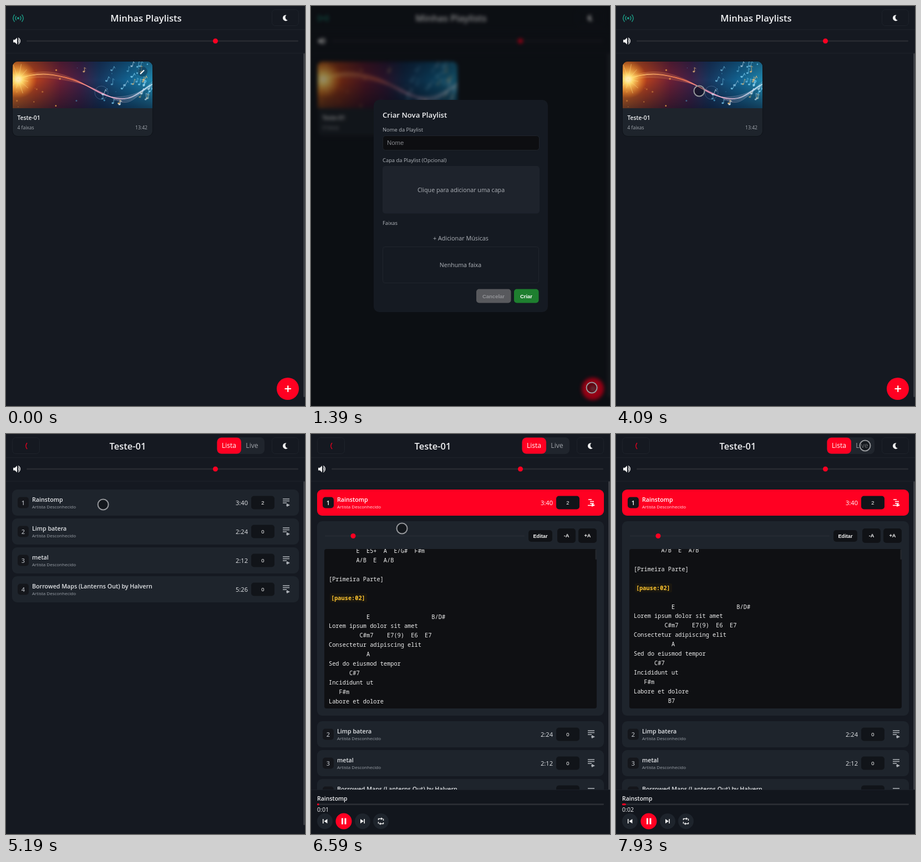
An HTML page that plays this animation: 539 px wide and 720 px high, repeating every 7.99 s.

```html
<!DOCTYPE html>
<html lang="pt">
<head>
<meta charset="utf-8">
<title>Minhas Playlists</title>
<style>
  html, body { margin: 0; width: 100%; height: 100%; overflow: hidden; background: #151921; }
  svg { display: block; width: 539px; height: 720px; }
  text { font-family: "Open Sans", "Noto Sans", sans-serif; white-space: pre; }
  .arial { font-family: "Liberation Sans", Arial, sans-serif; }
  .mono { font-family: "Noto Sans Mono", "DejaVu Sans Mono", monospace; }
</style>
</head>
<body>
<svg id="stage" viewBox="0 0 539 720"></svg>
<script>
const LOOP = 7990;
const MODAL_OPEN = 1200, MODAL_CLOSE = 3300, DETAIL_OPEN = 4700, PLAY_START = 5480;
const RED = '#ff0022', CARD = '#1e242c', DARK = '#101216', LINE = '#1e232b';
const SONG = 'Rainstomp';

const rect = (x, y, w, h, r, fill, extra = '') =>
  `<rect x="${x}" y="${y}" width="${w}" height="${h}" rx="${r}" fill="${fill}" ${extra}/>`;
const circle = (x, y, r, fill, extra = '') =>
  `<circle cx="${x}" cy="${y}" r="${r}" fill="${fill}" ${extra}/>`;
const stroke = (d, color, width = 1.5, extra = '') =>
  `<path d="${d}" fill="none" stroke="${color}" stroke-width="${width}" ${extra}/>`;
const shape = (d, fill) => `<path d="${d}" fill="${fill}"/>`;
const text = (x, y, size, str, fill = '#fff', weight = 400, anchor = 'start', extra = '') =>
  `<text x="${x}" y="${y}" font-size="${size}" fill="${fill}" font-weight="${weight}" text-anchor="${anchor}" ${extra}>${str}</text>`;
const arial = (x, y, size, str, fill, weight = 700, anchor = 'middle') =>
  text(x, y, size, str, fill, weight, anchor, 'class="arial"');
const group = (id, content, extra = '') => `<g id="${id}" ${extra}>${content}</g>`;

function seeded(seed) {
  return () => (seed = (seed * 16807) % 2147483647) / 2147483647;
}

function cover() {
  const rnd = seeded(77);
  let art = rect(12, 100, 252, 84, 0, 'url(#sky)') + rect(12, 100, 252, 84, 0, 'url(#shade)');
  for (let i = 0; i < 24; i++) {
    const x = 14 + rnd() * 248, y = 102 + rnd() * 80;
    art += circle(x, y, 0.5 + rnd() * 1.6, x < 110 ? '#ffb04a' : '#5cc8f5', `opacity="${0.25 + rnd() * 0.5}"`);
  }
  for (let i = 0; i < 6; i++) {
    const k = i * 2.4;
    art += stroke(`M20 ${130 + k / 3}C60 ${112 + k} 90 ${118 + k} 120 ${130 + k / 2}S170 ${166 - k} 200 ${164 + k / 2}S245 ${155 - k} 264 ${136 + k}`,
      'url(#wave)', i === 2 ? 1.8 : 0.7, `opacity="${i === 2 ? 0.9 : 0.55}"`);
  }
  art += circle(172, 156, 12, 'none', 'stroke="#6b88b0" opacity=".45"');
  for (let i = 0; i < 32; i++) {
    const x = 130 + Math.sqrt(rnd()) * 130, y = 108 + rnd() * 70, h = 6 + rnd() * 5;
    const color = ['#d9efff', '#7ed0f4', '#f4c37c'][Math.floor(rnd() * 3)];
    art += `<g transform="translate(${x} ${y}) rotate(${rnd() * 40 - 10})" opacity="${0.45 + rnd() * 0.45}">` +
      `<ellipse rx="2" ry="1.5" fill="${color}"/>` + stroke(`M1.7 0V${-h}l3 2.5`, color, 0.9) + '</g>';
  }
  art += circle(22, 132, 34, 'url(#burst)');
  for (let i = 0; i < 12; i++) {
    const a = i * Math.PI / 6 + 0.2, r = 14 + rnd() * 16;
    art += stroke(`M22 132l${Math.cos(a) * r} ${Math.sin(a) * r}`, '#ffe08a', 0.8, 'opacity=".6"');
  }
  return art;
}

const header =
  stroke('M0 42.5H539M0 85H539', LINE, 1) +
  rect(479.5, 6.5, 48, 29, 6, 'none', `stroke="${LINE}"`) +
  shape('M505.5 16.3A5.4 5.4 0 1 0 508 25.6A5.3 5.3 0 0 1 505.5 16.3Z', '#f2f2f2') +
  shape('M13 60.7h3l4-3.8v12.4l-4-3.8h-3z', '#f2f2f2') +
  stroke('M22 60.3q2.4 2.8 0 5.6M22.3 57.4q6.4 5.6 0 11.4', '#f2f2f2', 1.4) +
  rect(37, 61.8, 490, 2.5, 1.2, '#282b32') + circle(377.5, 63, 4.5, RED) +
  rect(536, 85, 3, 619, 1.5, '#3b3e44');

const home =
  group('live', circle(22, 22, 2, 'currentColor') +
    stroke('M18.6 18.3q-3 3.7 0 7.4M25.4 18.3q3 3.7 0 7.4M15.5 15.5q-5.4 6.5 0 13M28.5 15.5q5.4 6.5 0 13', 'currentColor', 1.5)) +
  text(252.5, 27.5, 16.6, 'Minhas Playlists', '#f0f1f3', 600, 'middle') +
  rect(11, 99, 254, 136, 10, '#0f1319') + rect(12, 100, 252, 134, 9, CARD) +
  `<g clip-path="url(#coverClip)">${cover()}</g>` +
  group('pencil', circle(246, 118, 9, '#10304a', 'opacity=".5"') + stroke('M242 122.500l7-7', '#fff', 2.2)) +
  text(20.500, 205, 10.3, 'Teste-01', '#f2f3f5', 600) +
  text(20.500, 222, 8.5, '4 faixas', '#a4a9b0') +
  text(255, 222, 8.6, '13:42', '#a4a9b0', 400, 'end') +
  circle(508, 689, 20, RED) + stroke('M502.500 689h11.500M508.250 683.250v11.500', '#fff', 2.2);

function row(y, number, title, time, count, active = false) {
  const icon = active ? '#fff' : '#aeb2b8';
  const lines = active ? 'M500 -5h6M503 -1.500h7M503 2h7M499 5.500h12' : 'M499 -6h12M499 -2.500h12M499 1h7M505 5h4';
  return rect(11, y, 517, 47, 9, active ? RED : CARD) +
    rect(21, y + 13.5, 20, 20, 5, '#14161b') +
    text(31, y + 27.5, 11, number, active ? '#fff' : '#a9adb3', 600, 'middle') +
    text(47, y + 22, 10.7, title, active ? '#fff' : '#e4e6e9', 600) +
    text(47, y + 34, 8, 'Artista Desconhecido', active ? '#ffe3e6' : '#9ba1a9') +
    text(436, y + 27.5, 11.1, time, active ? '#fff' : '#e4e6e9', 400, 'end') +
    rect(442, y + 11.5, 42, 24, 5, '#111419') +
    arial(463, y + 27, 9.5, count, '#fff', 400) +
    `<g transform="translate(0 ${y + 23})">${stroke(lines, icon, 1.6)}${shape('M506 2l6 3-6 3z', icon)}</g>`;
}

const otherRows = y =>
  row(y, 2, 'Limp batera', '2:24', 0) +
  row(y + 52, 3, 'metal', '2:12', 0) +
  row(y + 104, 4, 'Borrowed Maps (Lanterns Out) by Halvern', '5:26', 0);

const lyrics = `[Intro] E  E5+  A  F#m  A/B
        E  E5+  A  E/G#  F#m
        A/B  E  A/B

[Primeira Parte]

[pause:02]

           E                  B/D#
Lorem ipsum dolor sit amet
         C#m7    E7(9)  E6  E7
Consectetur adipiscing elit
           A
Sed do eiusmod tempor
      C#7
Incididunt ut
   F#m
Labore et dolore
          B7`.split('\n').map((line, i) => {
  const y = i * 16.9, pause = line.startsWith('[pause');
  return (pause ? rect(34, y - 8, 67, 16, 2, '#1a1710') : '') +
    text(pause ? 36 : 32, y + 3.7, 10.3, line, pause ? '#ffc52e' : '#f0f0f0', pause ? 700 : 400, 'start', 'class="mono"');
}).join('');

const smallButton = (x, y, w, h, label) =>
  rect(x, y, w, h, 5, DARK) + arial(x + w / 2, y + h / 2 + 3.2, 9.2, label, '#f4f4f4');

const playing =
  row(100, 1, SONG, '3:40', 2, true) +
  rect(11, 157, 517, 350, 9, CARD) +
  rect(25, 182.5, 360, 2, 1, '#262b33') + circle(76, 183.5, 4.5, RED) +
  smallButton(392, 173, 43, 21, 'Editar') +
  smallButton(444, 170, 33, 26, '-A') +
  smallButton(482, 170, 33, 26, '+A') +
  rect(24, 207, 491, 287, 4, '#0f1013') + rect(512.5, 208, 2.5, 18, 1, '#24272d') +
  `<g clip-path="url(#lyricsClip)">${group('lyrics', lyrics)}</g>` +
  otherRows(517) +
  rect(0, 640, 539, 80, 0, '#12161d') + stroke('M0 640.5H539', '#1b2028', 1) +
  text(11, 660, 10.5, SONG, '#f2f3f5', 600) +
  rect(11, 665.3, 517, 2.6, 1.3, '#2b2e34') +
  rect(11, 665, 2, 3.2, 1.5, RED, 'id="progress"') +
  text(11, 680, 10.7, '0:00', '#f2f3f5', 400, 'start', 'id="clock"') +
  [25, 93, 126].map(x => circle(x, 697, 14, CARD)).join('') + circle(59, 697, 14.5, RED) +
  shape('M21 693h1.600v8H21zM29.500 693v8l-6-4z', '#f2f2f2') +
  shape('M55 691.500h3v11h-3zM60.500 691.500h3v11h-3z', '#fff') +
  shape('M95.400 693H97v8h-1.600zM89 693v8l6-4z', '#f2f2f2') +
  stroke('M121.500 695v-2.500h6M130.500 699v2.500h-6M130.500 696v-3.500M121.500 698v3.500', '#f2f2f2', 1.4) +
  shape('M126.500 690l3 2.500-3 2.500zM125.500 699l-3 2.500 3 2.500z', '#f2f2f2');

const detail =
  rect(11.5, 6.5, 49, 29, 6, 'none', `stroke="${LINE}"`) +
  stroke('M38 16q-4.500 5.500 0 11', '#e0001f', 1.5) +
  text(219.5, 27.5, 16.5, 'Teste-01', '#f0f1f3', 600, 'middle') +
  rect(380, 6, 86, 30, 8, '#20252d') + rect(380.5, 6.5, 43.5, 29, 8, RED) +
  text(402, 25, 12, 'Lista', '#fff', 400, 'middle') +
  text(443.5, 25, 12.2, 'Live', '#a0a4aa', 400, 'middle') +
  group('idle', row(100, 1, SONG, '3:40', 2) + otherRows(152)) +
  group('playing', playing);

const modal =
  rect(113, 169, 314, 382, 10, '#151a22') +
  text(129, 201, 13.2, 'Criar Nova Playlist', '#f2f3f5', 600) +
  text(129, 226, 9.4, 'Nome da Playlist', '#b4b8be') +
  rect(129.5, 233.5, 282, 26, 5, '#0d0e11', 'stroke="#20242b"') +
  arial(137, 250, 11.4, 'Nome', '#85878c', 400, 'start') +
  text(129, 281, 9.4, 'Capa da Playlist (Opcional)', '#b4b8be') +
  rect(129, 288, 283, 85.5, 5, '#1e232c') +
  text(270.5, 334.5, 10.7, 'Clique para adicionar uma capa', '#b0b4ba', 400, 'middle') +
  text(129, 394, 9.4, 'Faixas', '#b4b8be') +
  text(270, 422, 10.8, '+ Adicionar Músicas', '#b0b4ba', 400, 'middle') +
  rect(129.5, 433.5, 281, 65, 4, 'none', 'stroke="#20252d"') +
  text(269.5, 470, 10.6, 'Nenhuma faixa', '#b0b4ba', 400, 'middle') +
  rect(298, 509.5, 62.5, 25, 5, '#58595d') + arial(329, 525.5, 9.5, 'Cancelar', '#929397') +
  rect(366, 509.5, 44.5, 25, 5, '#1e7f2f') + arial(388, 525.5, 9.4, 'Criar', '#fff');

const stops = list => list.map(([o, c, a = 1]) => `<stop offset="${o}" stop-color="${c}" stop-opacity="${a}"/>`).join('');

document.getElementById('stage').innerHTML = `<defs>
  <linearGradient id="sky">${stops([[0, '#e8701c'], [.16, '#b5401d'], [.34, '#6c1f35'], [.48, '#432046'], [.62, '#17375f'], [.82, '#12618f'], [1, '#1f86ae']])}</linearGradient>
  <linearGradient id="shade" x2="0" y2="1">${stops([[0, '#0a1024', .35], [.4, '#0a1024', 0], [1, '#0a1024', .6]])}</linearGradient>
  <linearGradient id="wave">${stops([[0, '#ffe48a'], [.4, '#ff7a4a'], [.6, '#ff9fc0'], [1, '#c6efff']])}</linearGradient>
  <radialGradient id="burst">${stops([[0, '#fffbe0'], [.25, '#ffdf70', .95], [1, '#ff8a1c', 0]])}</radialGradient>
  <clipPath id="coverClip"><path d="M12 184V109a9 9 0 0 1 9-9H255a9 9 0 0 1 9 9V184Z"/></clipPath>
  <clipPath id="lyricsClip"><rect x="24" y="207" width="491" height="287"/></clipPath>
</defs>` +
  rect(0, 0, 539, 720, 0, '#151921') +
  group('page', header + group('home', home) + group('detail', detail)) +
  group('modal', rect(0, 0, 539, 720, 0, '#000', 'opacity=".42"') + modal) +
  circle(0, 0, 9.5, '#000', 'id="cursor" fill-opacity=".35" stroke="#96989c" stroke-width="2"');

const el = Object.fromEntries([...document.querySelectorAll('#stage [id]')].map(e => [e.id, e]));
const show = (node, on) => node.style.display = on ? '' : 'none';
const smooth = k => k * k * (3 - 2 * k);
const linear = k => k;

// Each key is [time, ...values].
function track(keys, t, ease) {
  const i = keys.findIndex(key => key[0] > t);
  if (i === 0) return keys[0].slice(1);
  if (i < 0) return keys[keys.length - 1].slice(1);
  const a = keys[i - 1], b = keys[i], k = ease((t - a[0]) / (b[0] - a[0]));
  return a.slice(1).map((v, j) => v + (b[j + 1] - v) * k);
}

const cursorPath = [
  [250, 556, 640], [900, 507, 687], [1500, 506, 687], [2350, 228, 253], [2700, 228, 253],
  [3150, 329, 522], [3400, 329, 522], [4050, 150, 153], [4750, 150, 153], [5300, 178, 124],
  [6000, 178, 124], [6450, 164, 170], [6850, 164, 170], [7700, 449, 21]
];
const scrollPath = [[PLAY_START, 216.8], [5900, 208], [6590, 193.7], [7930, 175.7], [LOOP, 174.9]];
const presses = [[1050, 1250], [3180, 3320], [4550, 4720], [5400, 5950]];

function draw() {
  const t = performance.now() % LOOP;
  const modalOpen = t >= MODAL_OPEN && t < MODAL_CLOSE;
  const onDetail = t >= DETAIL_OPEN, isPlaying = t >= PLAY_START;

  show(el.home, !onDetail);
  show(el.detail, onDetail);
  show(el.idle, !isPlaying);
  show(el.playing, isPlaying);
  show(el.modal, modalOpen);
  show(el.pencil, t < MODAL_OPEN);
  el.page.style.filter = modalOpen ? 'blur(3px)' : 'none';

  const glow = 0.5 + 0.5 * Math.cos(t / 1000 * Math.PI);
  el.live.style.color = `rgb(28,${128 + 22 * glow},${105 + 25 * glow})`;

  const seconds = Math.max(0, t - PLAY_START) / 1000;
  el.clock.textContent = '0:0' + Math.floor(seconds);
  el.progress.setAttribute('width', Math.max(1.5, 517 * seconds / 220 + 1));
  el.lyrics.setAttribute('transform', `translate(0 ${track(scrollPath, t, linear)[0]})`);

  const [x, y] = track(cursorPath, t, smooth);
  const pressed = presses.some(([from, to]) => t >= from && t < to);
  el.cursor.setAttribute('transform', `translate(${x} ${y})`);
  el.cursor.setAttribute('fill-opacity', pressed ? 0.45 : 0.35);
  requestAnimationFrame(draw);
}
draw();
</script>
</body>
</html>
```
